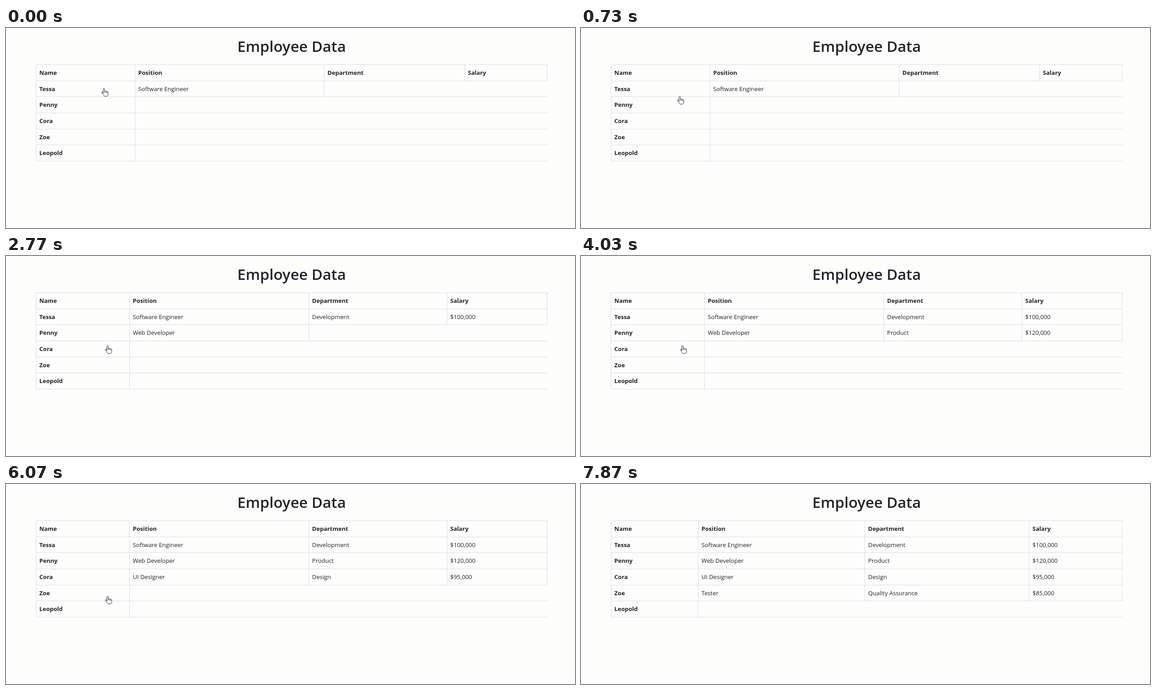
These frames come from a looping animation (1260 by 444 pixels, 8000 ms). An HTML page:

```html
<!DOCTYPE html>
<html lang="en">
<head>
<meta charset="utf-8">
<title>Employee Data</title>
<style>
  html, body { margin: 0; width: 100%; height: 100%; overflow: hidden; background: #fdfdfc; }
  svg { display: block; font: 13.15px "Open Sans", "Noto Sans", sans-serif; fill: #212529; }
  .title { font-size: 33.2px; font-weight: 600; text-anchor: middle; }
  .bold { font-size: 13.05px; font-weight: 700; }
  .lines { stroke: #d9dce1; fill: none; }
  #hand { fill: #fff; stroke: #20202c; stroke-linejoin: round; }
</style>
</head>
<body>
<svg width="1260" height="444" viewBox="0 0 1260 444">
  <text class="title" x="632.5" y="53.2">Employee Data</text>
  <g id="table"></g>
  <path id="hand" d="M-1.6 11V1.7a1.5 1.5 0 0 1 3 0V6q2-.8 2.8.7q2-.5 2.6.8q2.2-.4 2.2 1.8v3.2q0 5-4.5 5h-2q-2 0-3.2-2.2l-4.2-5.8q-.3-2 1.4-1.6zM1.4 6v3.5M4.2 6.7v3M6.8 7.5v2.6"/>
</svg>
<script>
const LOOP = 8000, LEFT = 66, RIGHT = 1198, TOP = 81, ROW = 35.67;

// The first `ready` cells are always there; the others arrive from `start`, one per `gap`.
const rows = [
  { ready: 4, cells: ["Name", "Position", "Department", "Salary"] },
  { ready: 2, start: 800, gap: 200, cells: ["Tessa", "Software Engineer", "Development", "$100,000"] },
  { ready: 1, start: 2770, gap: 200, cells: ["Penny", "Web Developer", "Product", "$120,000"] },
  { ready: 1, start: 5370, gap: 30, cells: ["Cora", "UI Designer", "Design", "$95,000"] },
  { ready: 1, start: 7230, gap: 300, cells: ["Zoe", "Tester", "Quality Assurance", "$85,000"] },
  { ready: 1, cells: ["Leopold"] },
];

// Columns share the table in proportion to their widest content.
const baseWidths = [66, 126, 93.5, 55];
const wideCells = { "Development": 97.2, "$100,000": 70.2, "Quality Assurance": 124.4 };

// The pointer drifts, then hops down row by row.
const handStart = { x: 217, y: 134, leaves: 7630 };
const handMoves = [
  { from: 0, to: 570, dx: -1, dy: 5 },
  { from: 570, to: 1000, dx: 7, dy: 34 },
  { from: 2740, to: 2770, dx: 2, dy: 26 },
  { from: 5370, to: 5430, dx: 0, dy: 50 },
  { from: 7430, to: 7630, dx: -8, dy: 24 },
];

const table = document.getElementById("table");
const hand = document.getElementById("hand");
const clamp = (v, min, max) => Math.min(Math.max(v, min), max);
const rowTop = i => TOP + Math.round(i * ROW);

function visibleCells({ ready, start, gap, cells }, t) {
  const arrived = t >= start ? Math.floor((t - start) / gap) + 1 : 0;
  return cells.slice(0, ready + arrived);
}

function columnBorders(grid) {
  const widths = baseWidths.map((base, c) =>
    Math.max(base, ...grid.map(cells => wideCells[cells[c]] || 0)));
  const scale = (RIGHT - LEFT) / widths.reduce((a, b) => a + b);
  let x = LEFT;
  return [LEFT, ...widths.map(w => Math.floor((x += w * scale) + 1e-6))];
}

function tableMarkup(grid) {
  const borders = columnBorders(grid);
  let lines = "", text = "";
  const vertical = (x, r) => lines += `M${x + .5} ${rowTop(r)}V${rowTop(r + 1) + 1}`;
  for (let i = 0; i <= grid.length; i++) lines += `M${LEFT} ${rowTop(i) + .5}H${RIGHT + 1}`;
  grid.forEach((cells, r) => {
    vertical(LEFT, r);
    cells.forEach((cell, c) => {
      vertical(borders[c + 1], r);
      const bold = r === 0 || c === 0 ? ' class="bold"' : "";
      text += `<text${bold} x="${borders[c] + 7.8}" y="${rowTop(r) + 22.7}">${cell}</text>`;
    });
  });
  return `<path class="lines" d="${lines}"/>${text}`;
}

function moveHand(t) {
  let { x, y, leaves } = handStart;
  for (const { from, to, dx, dy } of handMoves) {
    const progress = clamp((t - from) / (to - from), 0, 1);
    x += dx * progress;
    y += dy * progress;
  }
  hand.setAttribute("transform", `translate(${x} ${y})`);
  hand.style.display = t < leaves ? "" : "none";
}

let shown = "";
function draw() {
  const t = performance.now() % LOOP;
  const grid = rows.map(row => visibleCells(row, t));
  const state = grid.join("|");
  if (state !== shown) {
    table.innerHTML = tableMarkup(grid);
    shown = state;
  }
  moveHand(t);
  requestAnimationFrame(draw);
}
draw();
</script>
</body>
</html>
```
